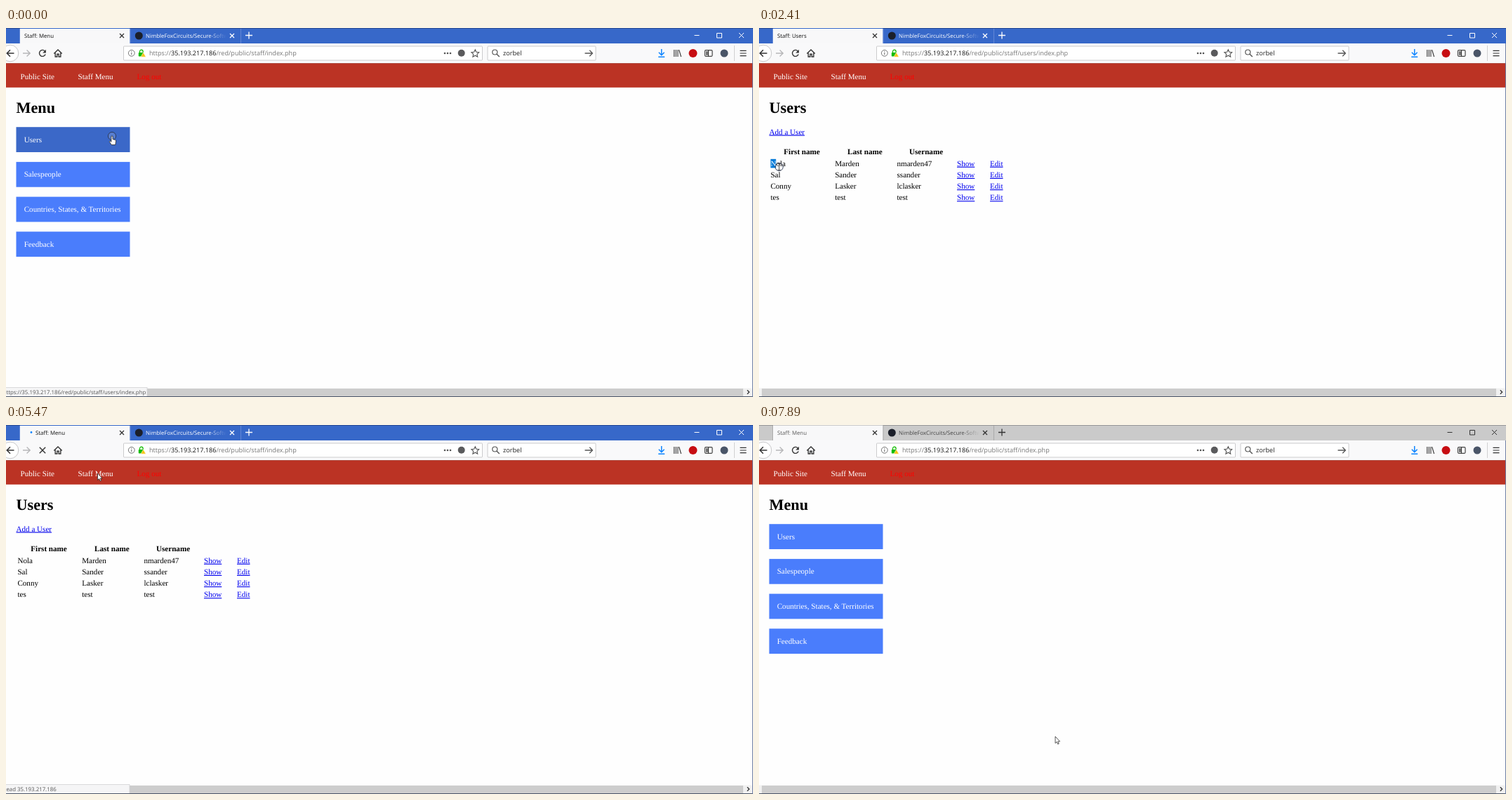
Write an HTML page that moves like this. It is 1064x526 px and loops after 8000 ms.

```html
<!DOCTYPE html>
<html lang="en">
<head>
<meta charset="utf-8">
<title>Staff</title>
<style>
html, body { margin: 0; width: 100%; height: 100%; overflow: hidden; background: #fefefe; }
svg { display: block; width: 1064px; height: 526px; --bar: #3768c9; --tab: #fff; --ink: #fff; --edge: #6d90da; --name: #111; --top: #2c4d94; }
svg.idle { --bar: #cacaca; --tab: #444; --ink: #333; --edge: #a2a2a2; --name: #5a5a5a; --top: #999; }
text { font: 11.1px "Liberation Serif", "Times New Roman", serif; text-rendering: geometricPrecision; white-space: pre; }
.ui { font: 7.85px "Open Sans", "Noto Sans", sans-serif; }
.url { font: 9.1px "Open Sans", "Noto Sans", sans-serif; }
.h { font-size: 22.2px; font-weight: bold; }
.b { font-weight: bold; }
.w { fill: #fff; }
.a { fill: #00e; text-decoration: underline; }
.ln { fill: none; stroke: #333; stroke-width: 1.3; }
.ink { fill: none; stroke: var(--ink); stroke-width: 1; }
stop { stop-color: var(--tab); }
</style>
</head>
<body>
<svg id="stage" viewBox="0 0 1064 526" xmlns="http://www.w3.org/2000/svg"></svg>
<script>
const stage = document.getElementById('stage');
const LOOP = 8000;

const text = (x, y, s, cls = '', more = '') => `<text x="${x}" y="${y}" class="${cls}" ${more}>${s}</text>`;
const rect = (x, y, w, h, fill, more = '') => `<rect x="${x}" y="${y}" width="${w}" height="${h}" fill="${fill}" ${more}/>`;
const line = (d, cls = 'ln', more = '') => `<path d="${d}" class="${cls}" ${more}/>`;
const dot = (x, y, r, fill, more = '') => `<circle cx="${x}" cy="${y}" r="${r}" fill="${fill}" ${more}/>`;
const cross = (x, y, r) => `M${x - r} ${y - r}l${2 * r} ${2 * r}m0 ${-2 * r}l${-2 * r} ${2 * r}`;
const group = (id, body) => `<g id="${id}">${body}</g>`;

const tabs =
  rect(0, 0, 1064, 22, 'var(--bar)') +
  rect(0, 0, 1064, 1, 'var(--top)') +
  rect(20, 1, 156.5, 22, '#f8f8f9') +
  rect(20, 0, 156.5, 1, 'var(--bar)') +
  line('M19.5 1V22M177 1V22M334.5 1V22', '', 'stroke="var(--edge)" stroke-width=".8"') +
  text(26, 13.8, '', 'ui', 'id="title" fill="var(--name)"') +
  dot(36, 10.5, 1.4, '#0a84ff', 'id="spin"') +
  line(cross(165, 11, 3), 'ln') +
  dot(189.3, 11, 5.5, '#1b1f2a') +
  `<g clip-path="url(#cut)">${text(199, 13.8, 'NimbleFoxCircuits/Secure-Software', 'ui', 'fill="url(#fade)"')}</g>` +
  line(cross(322, 11, 3), 'ink', 'style="stroke-width:1.3"') +
  line('M341 10.5h10m-5-5v10', 'ink', 'style="stroke-width:1.3"') +
  line('M980.5 10.5h7M1012.5 7.5h7v6.5h-7zM' + cross(1047.5, 10.5, 3.5).slice(1), 'ink');

const toolbar =
  rect(0, 22, 1064, 28.5, '#f9f9fa') +
  dot(6, 36, 11.8, '#fff', 'stroke="#b9b9bb" stroke-width=".8"') +
  line('M11.5 36H1.5M6 31.3L1.3 36L6 40.7', 'ln', 'style="stroke-width:1.5"') +
  line('M24 36H34M29.6 31.5L34.2 36L29.6 40.5', 'ln', 'style="stroke:#b7b7b9;stroke-width:1.4"') +
  group('reload', line('M55.3 32.8A4.5 4.5 0 1 0 56.2 37.5', 'ln', 'style="stroke-width:1.4"') + '<path d="M56.9 30.8V35.4H52.3Z" fill="#333"/>') +
  group('halt', line(cross(52, 36, 4.2), 'ln', 'style="stroke-width:1.4"')) +
  line('M68.3 36.4L74 31L79.7 36.4M70.2 35.5V41H72.8V37.3H75.2V41H77.8V35.5', 'ln', 'style="stroke-width:1.4"') +
  rect(167.5, 26, 511, 20, '#fff', 'stroke="#c6c6c8" stroke-width=".9" rx="1"') +
  dot(178.8, 35.8, 4.4, 'none', 'stroke="#666" stroke-width=".9"') +
  line('M178.8 35v3.2M178.8 33v1.1', 'ln', 'style="stroke:#666;stroke-width:1"') +
  line('M190.5 35.5V33.5a2.3 2.3 0 0 1 4.6 0V35', 'ln', 'style="stroke:#12bc00;stroke-width:1.3"') +
  rect(188.8, 35, 7, 5.5, '#12bc00', 'rx=".8"') +
  '<path d="M195.6 34.8L199.2 41.2H192Z" fill="#f5c518" stroke="#fff" stroke-width=".5"/>' +
  text(204, 39.3, '', 'url', 'id="url" fill="#777"') +
  [625, 629, 633].map(x => dot(x, 36, 1.3, '#555')).join('') +
  dot(648.7, 35.8, 5, '#5a5a5c') +
  line('M668.3 30.8l1.6 3.5 3.8.4-2.8 2.6.8 3.8-3.4-1.9-3.4 1.9.8-3.8-2.8-2.6 3.8-.4z', 'ln', 'style="stroke:#555;stroke-width:1.1"') +
  rect(686, 26, 154, 20, '#fff', 'stroke="#c6c6c8" stroke-width=".9" rx="1"') +
  dot(696.3, 34.5, 3.5, 'none', 'stroke="#555" stroke-width="1.2"') +
  line('M698.8 37L702.8 41', 'ln', 'style="stroke:#555;stroke-width:1.4"') +
  text(708, 39.3, 'zorbel', 'url', 'fill="#222"') +
  line('M824.5 36H835M831.2 31.8L835.4 36L831.2 40.2', 'ln', 'style="stroke:#555"') +
  line('M933.7 30V38.5M929.8 34.8L933.7 38.7L937.6 34.8M929.2 41.2h9', 'ln', 'style="stroke:#0a84ff;stroke-width:1.5"') +
  line('M951.7 31V41M954.3 31V41M956.9 31V41M958.6 31.2L961.6 41', 'ln', 'style="stroke-width:1.1"') +
  dot(978.5, 36, 6, '#c70d12') +
  rect(995.5, 31.7, 10.5, 8.6, 'none', 'stroke="#444" stroke-width="1.2" rx="1.2"') +
  rect(997, 33.2, 2.8, 5.6, '#666') +
  line('M1000.5 32V40', 'ln', 'style="stroke-width:1"') +
  dot(1023, 36, 5.5, '#4a5568') +
  line('M1037.5 25V47', 'ln', 'style="stroke:#d0d0d2;stroke-width:1"') +
  line('M1045.5 32.3h9M1045.5 36h9M1045.5 39.7h9', 'ln', 'style="stroke-width:1.2"');

const nav =
  rect(0, 50.5, 1064, 34.3, '#bb3324') +
  rect(0, 50, 1064, .8, '#a33a2f') +
  text(20.5, 72.6, 'Public Site', 'w') + text(102.5, 72.6, 'Staff Menu', 'w') +
  text(186.5, 72.6, 'Log out', '', 'fill="#f00"');

const menu = text(14.5, 120.6, 'Menu', 'h') +
  ['Users', 'Salespeople', 'Countries, States, &amp; Territories', 'Feedback'].map((s, i) => {
    const y = 141.2 + 49.7 * i;
    return rect(14.5, y, 162, 35.8, '#4a7dfc', `id="item${i}"`) + text(25.7, y + 21.3, s, 'w');
  }).join('');

const people = [
  ['Nola', 'Marden', 'nmarden47'],
  ['Sal', 'Sander', 'ssander'],
  ['Conny', 'Lasker', 'lclasker'],
  ['tes', 'test', 'test']
];
const users = text(14.5, 120.6, 'Users', 'h') + text(14.5, 151.5, 'Add a User', 'a') +
  text(35.3, 180.4, 'First name', 'b') + text(126, 180.4, 'Last name', 'b') + text(214, 180.4, 'Username', 'b') +
  people.map((p, i) => [...p, 'Show', 'Edit'].map((s, c) =>
    text([16.4, 108.2, 196.5, 282, 329][c], (196.7 + 16.2 * i).toFixed(1), s, c > 2 ? 'a' : '')).join('')).join('') +
  group('sel', rect(16.5, 186.8, 8, 12.6, '#0078d7', 'id="mark"') +
    `<g clip-path="url(#picked)">${text(16.4, 196.7, people[0][0], 'w')}</g>`);

const foot =
  rect(0, 513.5, 1064, 12, '#f1f1f1') +
  rect(4, 514, 1046, 11, '#cdcdcd', 'id="thumb"') +
  line('M1055.8 516.3L1058.6 519L1055.8 521.7', 'ln') +
  group('status', rect(-2, 512.5, 100, 13, '#f5f5f6', 'id="plate" stroke="#d2d2d4" stroke-width=".8"') +
    text(-4.4, 521.5, '', 'ui', 'id="note" fill="#555"')) +
  rect(0, 525, 1064, 1, '#4c5668') + rect(1063, 22, 1, 504, '#6f7fa5');

const pointer =
  group('ring', dot(0, 0, 5.6, '#fff', 'fill-opacity=".15" stroke="#2a3550" stroke-width=".9"')) +
  group('arrow', '<path d="M0 0V9.6L2.2 7.6L3.7 11L5.2 10.3L3.8 7.1H6.6Z" fill="#fff" stroke="#222" stroke-width=".75"/>') +
  group('beam', line('M-1.8-4.5H-.4L0-4.1L.4-4.5H1.8M0-4.1V4.1M-1.8 4.5H-.4L0 4.1L.4 4.5H1.8', 'ln', 'style="stroke-width:.9"')) +
  group('hand', '<path d="M-1.1 1a1.1 1.1 0 0 1 2.2 0V4.6L4.6 5.4Q5.7 5.8 5.6 7L4.8 12.6H-.6L-3.6 8.4Q-3.8 6.8-2.3 7.2L-1.1 8.3Z" fill="#fff" stroke="#222" stroke-width=".8"/>');

stage.innerHTML = `<defs>
  <linearGradient id="fade" gradientUnits="userSpaceOnUse" x1="288" y1="0" x2="314" y2="0"><stop offset="0"/><stop offset="1" stop-opacity="0"/></linearGradient>
  <clipPath id="cut">${rect(199, 0, 115, 22, '#000')}</clipPath>
  <clipPath id="picked">${rect(16.5, 186, 8, 14, '#000')}</clipPath></defs>` +
  rect(0, 0, 1064, 526, '#fefefe') + tabs + toolbar + nav + group('menu', menu) + group('users', users) + foot + group('pointer', pointer);

const el = {};
stage.querySelectorAll('[id]').forEach(e => el[e.id] = e);
const show = (id, on) => el[id].style.display = on ? '' : 'none';

// [first, last, steps]: the picture holds still between steps
const ticks = [0];
[[150, 810, 6], [940, 1080, 2], [1200, 2170, 8], [2290, 2410, 2], [2570, 2960, 4], [3230, 4270, 8], [4390, 4510, 2],
 [4650, 5350, 6], [5470, 5470, 1], [5610, 6300, 6], [6420, 6420, 1], [6570, 7210, 6], [7490, 7890, 4]]
  .forEach(([a, b, n]) => { for (let i = 0; i < n; i++) ticks.push(Math.round(a + (b - a) * i / Math.max(1, n - 1))); });

// time, x, y of the pointer
const route = [[0, 151, 154], [414, 150, 154], [810, 109, 162], [940, 76, 173], [1080, 46, 182], [1200, 36, 190],
  [1600, 22, 196], [2170, 18, 197], [2290, 19, 198], [2410, 28.7, 198], [2570, 38, 198], [2960, 41, 198],
  [3500, 44, 197], [3900, 58, 184], [4270, 82, 162], [4390, 101, 128], [4510, 120.5, 87], [4790, 130.5, 69],
  [5886, 130.5, 69], [6024, 150, 92], [6162, 186, 136], [6300, 209, 240], [6420, 240, 296], [6570, 290, 365],
  [7080, 385, 516], [7210, 392, 534], [7490, 398, 534], [7890, 422, 444]];
const shapes = [[0, 'hand'], [400, 'arrow'], [1200, 'beam'], [3900, 'arrow'], [4640, 'hand'], [5340, 'arrow']];
const SITE = 'https://35.193.217.186/red/public/staff/';
const notes = [[0, SITE + 'users/index.php', 201, 1], [400, 'Read 35.193.217.186', 176, 1], [540, '', 0, 0],
  [4640, SITE + 'index.php', 180, 1], [5460, 'Read 35.193.217.186', 176, 1], [5600, SITE + 'index.php', 180, 1],
  [6160, SITE + 'index.php', 180, .7], [6290, SITE + 'index.php', 180, .22], [6410, '', 0, 0]];
const picks = [[0, 0], [2400, 7.7], [2560, 21.5], [3490, 0]];

const last = (list, t) => list.filter(k => k[0] <= t).pop();
const within = (t, a, b) => t >= a && t < b;

function place(t) {
  const i = route.findIndex(k => k[0] > t);
  if (i < 0) return route[route.length - 1].slice(1);
  const [a, b] = [route[i - 1], route[i]], u = (t - a[0]) / (b[0] - a[0]);
  return [a[1] + (b[1] - a[1]) * u, a[2] + (b[2] - a[2]) * u];
}

function draw(time) {
  const t = ticks.filter(k => k <= time).pop();
  const [x, y] = place(t);
  const onUsers = within(t, 540, 5600), usersUrl = within(t, 400, 5460);
  const busy = within(t, 270, 540) || within(t, 5230, 5600);

  stage.classList.toggle('idle', t >= 7490);
  show('menu', !onUsers);
  show('users', onUsers);
  el.title.textContent = usersUrl ? 'Staff: Users' : 'Staff: Menu';
  el.title.setAttribute('x', busy ? 42 : 26);
  show('spin', busy);
  el.spin.setAttribute('cx', 33 + 3 * Math.cos((t - 5470) / 130));
  show('halt', busy);
  show('reload', !busy);
  el.reload.setAttribute('opacity', within(t, 540, 1080) || within(t, 5600, 6160) ? .35 : 1);
  el.url.innerHTML = `https://<tspan fill="#111">35.193.217.186</tspan>/red/public/staff/${usersUrl ? 'users/' : ''}index.php`;

  const over = x > 14 && x < 177 && y > 141 && y < 177;
  el.item0.setAttribute('fill', over ? '#3b68c8' : '#4a7dfc');
  const hovered = y > 513 && y < 526;
  el.thumb.setAttribute('fill', hovered ? '#a6a6a6' : '#cdcdcd');

  const [, note, wide, alpha] = last(notes, t);
  el.note.textContent = note;
  el.plate.setAttribute('width', wide + 2);
  el.plate.setAttribute('opacity', alpha);
  el.status.setAttribute('opacity', alpha);
  show('status', alpha > 0);

  const pick = last(picks, t)[1];
  show('sel', pick > 0);
  el.mark.setAttribute('width', pick);
  el.picked.firstChild.setAttribute('width', pick);

  const shape = last(shapes, t)[1];
  ['arrow', 'beam', 'hand'].forEach(s => show(s, s === shape));
  show('ring', t < 270 || within(t, 2160, 2700) || within(t, 3360, 3490) || within(t, 5060, 5200));
  el.pointer.setAttribute('transform', `translate(${x.toFixed(2)} ${y.toFixed(2)})`);
}

function frame() {
  draw(performance.now() % LOOP);
  requestAnimationFrame(frame);
}
frame();
</script>
</body>
</html>
```
